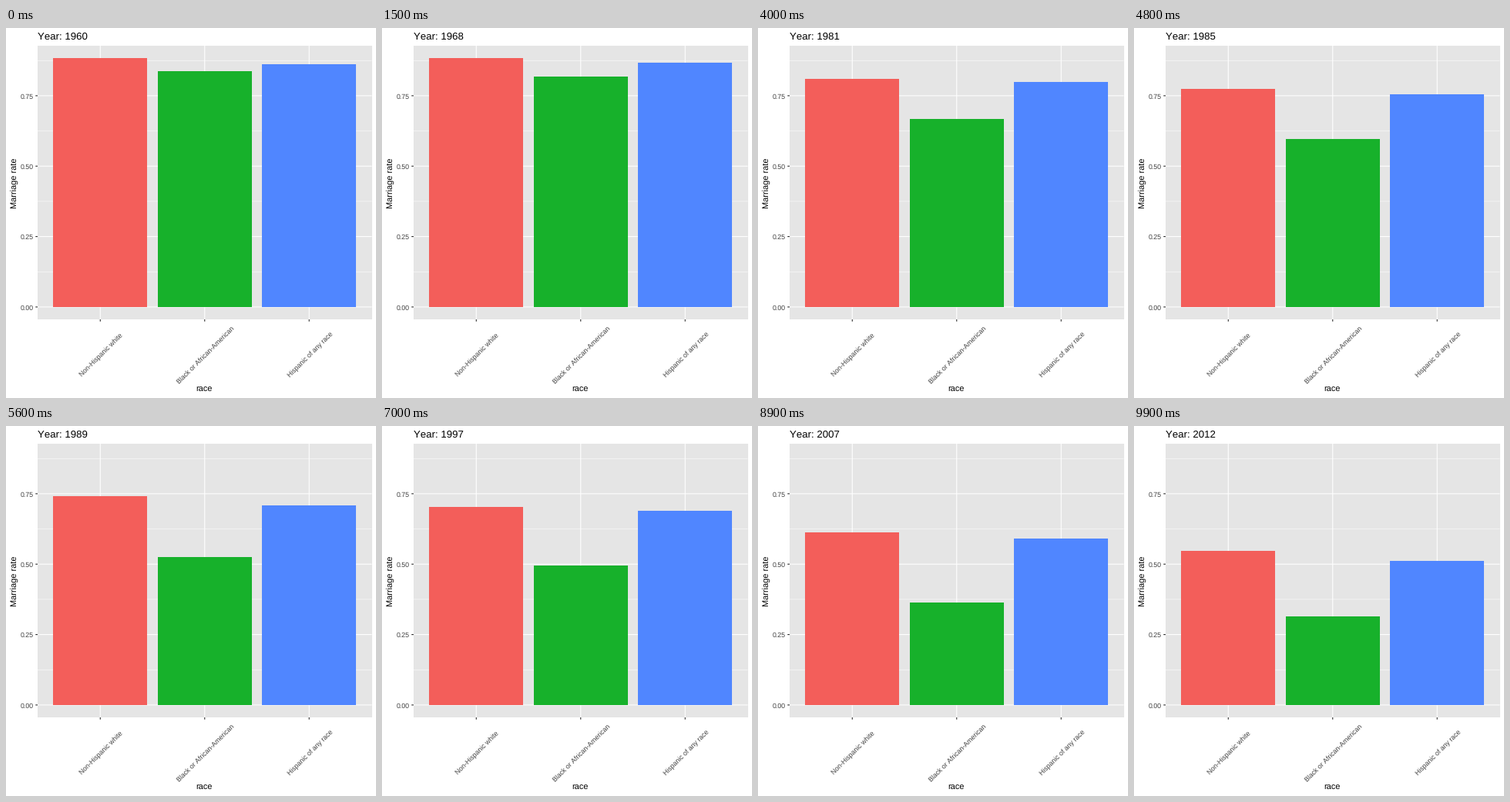
A matplotlib script that plays this animation: 480 by 480 pixels, repeating every 10 s.

```python
import matplotlib.pyplot as plt
import numpy as np
from matplotlib.animation import FuncAnimation
from matplotlib.patches import Rectangle

SIZE, DPI = 480, 100
FRAMES, INTERVAL = 100, 100
FIRST_YEAR, LAST_YEAR = 1960, 2012
SPAN = LAST_YEAR - FIRST_YEAR

LEFT, RIGHT, TOP, BOTTOM = 41, 474.52, 23, 378
ZERO_Y, UNIT = 361.92, 365.4
PITCH = (RIGHT - LEFT) / 3.2
BAR_WIDTH = 0.9 * PITCH
GREY_TEXT, GREY_TICK = "#404040", "#282828"

# Marriage rates at the years where the trend bends, straight in between
KEY_YEARS = np.array([1960, 1970, 1980, 1990, 2000, 2001, 2007, 2012])
GROUPS = [
    ("Non-Hispanic white", "#F35E5A",
     (0.8835, 0.8821, 0.8176, 0.7361, 0.6873, 0.6816, 0.6129, 0.5472)),
    ("Black or African-American", "#17B12B",
     (0.8378, 0.8145, 0.6863, 0.5161, 0.4855, 0.4562, 0.3648, 0.3145)),
    ("Hispanic of any race", "#5086FF",
     (0.8606, 0.8701, 0.8115, 0.7038, 0.6819, 0.6679, 0.5909, 0.5116)),
]
KEY_FRAMES = np.round((KEY_YEARS - FIRST_YEAR) * (FRAMES - 1) / SPAN)

plt.rcParams.update({
    "font.family": "Liberation Sans",
    "text.hinting": "none",
    "text.kerning_factor": 10,
})

fig = plt.figure(figsize=(SIZE / DPI, SIZE / DPI), dpi=DPI, facecolor="white")
ax = fig.add_axes([0, 0, 1, 1])
ax.set(xlim=(0, SIZE), ylim=(SIZE, 0))
ax.axis("off")


def y_of(rate):
    return ZERO_Y - rate * UNIT


def box(left, right, top, bottom, color, zorder):
    x, y = round(left), round(top)
    return ax.add_patch(Rectangle((x, y), round(right) - x, round(bottom) - y,
                                  facecolor=color, linewidth=0,
                                  antialiased=False, zorder=zorder))


def line(xs, ys, color="white", width=1.07):
    ax.plot(xs, ys, color=color, linewidth=width * 72 / DPI, snap=False,
            solid_capstyle="butt", zorder=2)


def label(x, y, text, size, color="black", ha="center", angle=0):
    return ax.text(x, y, text, fontsize=size * 72 / DPI, color=color, ha=ha,
                   va="baseline", rotation=angle, rotation_mode="anchor", zorder=4)


box(LEFT, RIGHT, TOP, BOTTOM, "#E5E5E5", 1)

for step in range(4):
    y = y_of(step / 4)
    y_minor = y_of(step / 4 + 1 / 8)
    line((LEFT, RIGHT), (y_minor, y_minor), width=0.53)
    line((LEFT, RIGHT), (y, y))
    line((LEFT - 2.74, LEFT), (y, y), GREY_TICK)
    label(35.8, y + 3.7, f"{step / 4:.2f}", 8.8, GREY_TEXT, ha="right")

bars = []
for i, (race, color, _) in enumerate(GROUPS):
    x = LEFT + (0.6 + i) * PITCH
    line((x, x), (TOP, BOTTOM))
    line((x, x), (BOTTOM, BOTTOM + 2.74), GREY_TICK)
    label(x + 3, 426.1, race, 8.8, GREY_TEXT, angle=45)
    bars.append(box(x - BAR_WIDTH / 2, x + BAR_WIDTH / 2, ZERO_Y, ZERO_Y, color, 3))

label(257, 472, "race", 11)
label(14.4, 201, "Marriage rate", 11, angle=90)
title = label(LEFT, 15, "", 13.2, ha="left")


def update(frame):
    year = FIRST_YEAR + SPAN * frame / (FRAMES - 1)
    title.set_text(f"Year: {round(year)}")
    for bar, (_, _, rates) in zip(bars, GROUPS):
        top = round(y_of(np.interp(frame, KEY_FRAMES, rates)))
        bar.set_y(top)
        bar.set_height(round(ZERO_Y) - top)
    return [title, *bars]


anim = FuncAnimation(fig, update, frames=FRAMES, interval=INTERVAL,
                     repeat=True, repeat_delay=0)
plt.show()
```
